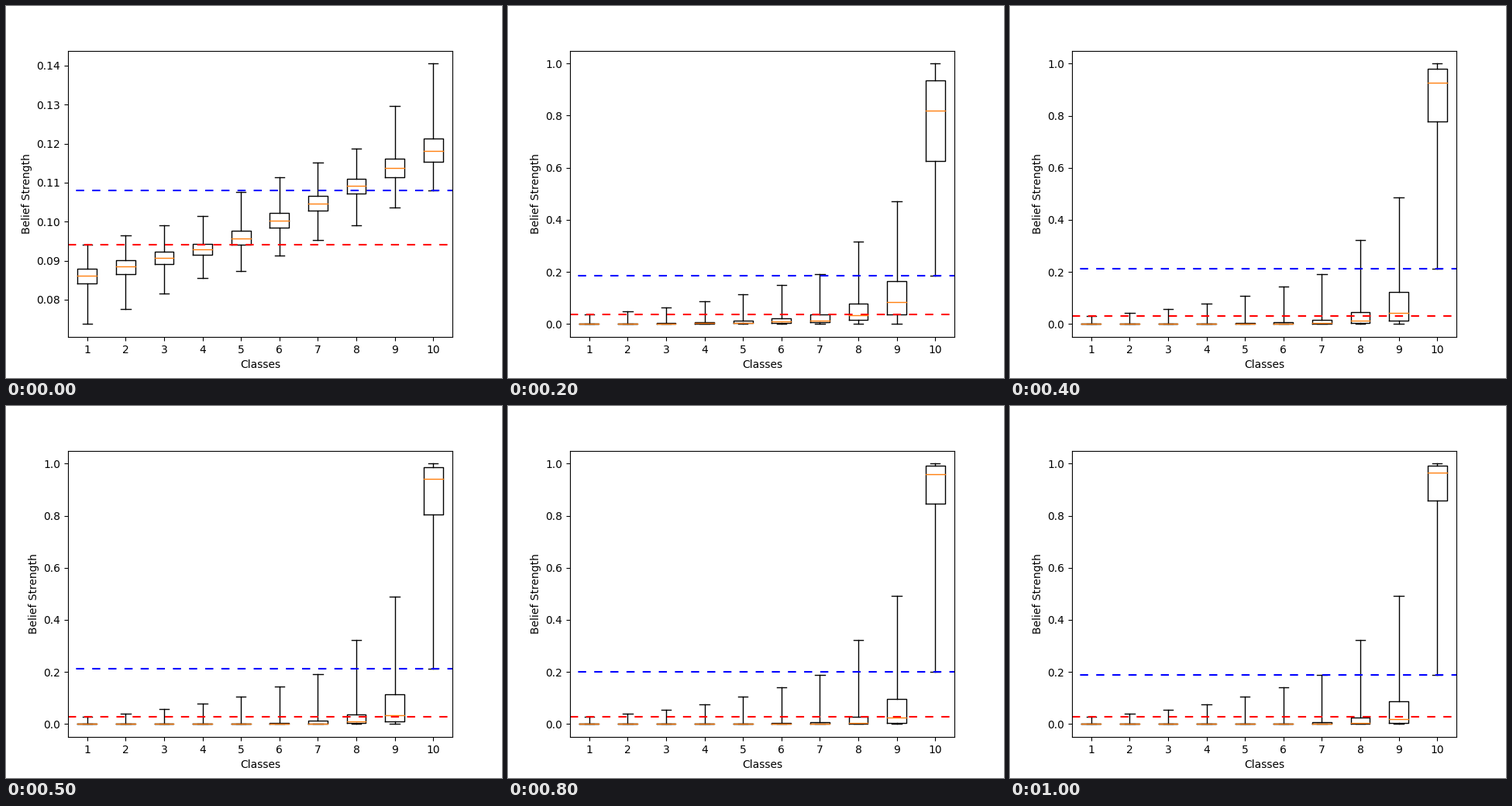
Animation of 640x480 px, one loop 1.1 s. Source, as a matplotlib script:

```python
import numpy as np
import matplotlib.pyplot as plt
from matplotlib.animation import FuncAnimation

CLASSES = np.arange(10)
TOP = CLASSES == 9
FRAMES = 11
LAST = FRAMES - 1


def curve(keys, *values):
    """Values for all classes, linear between a few key classes."""
    return np.interp(CLASSES, keys, values)


def logit(p):
    return np.log(p / (1 - p))


def trained_curve(*values):
    """Like curve, but linear in log-odds and denser among the top classes."""
    return curve((0, 1, 6, 8, 9), *logit(np.array(values)))


def learn(epoch, start, end, rate):
    """Move the log-odds from start to end with power-law slowing."""
    progress = (1 - epoch ** -rate) / (1 - LAST ** -rate)
    return 1 / (1 + np.exp(-(start + (end - start) * progress)))


def untrained():
    keys = (0, 3, 4, 7, 9)
    return (curve(keys, .07374, .0856, .0874, .0991, .1080),
            curve(keys, .0842, .0915, .0941, .1072, .1154),
            curve(keys, .0862, .0929, .0957, .1092, .1182),
            curve(keys, .0880, .0943, .0977, .1110, .1214),
            curve(keys, .0941, .1015, .1076, .1188, .1405))


# Log-odds of each statistic after the first and the last epoch.
Q1 = (trained_curve(.001, .006, .042, .115, .335),
      trained_curve(1e-5, 1e-5, 3e-4, .004, .859))
MEDIAN = (trained_curve(.004, .012, .065, .170, .460),
          trained_curve(2e-5, 2e-5, 8e-4, .020, .965))
Q3 = (trained_curve(.010, .021, .094, .225, .644),
      trained_curve(3e-5, 3e-5, .006, .088, .993))
HIGH = (trained_curve(.077, .085, .202, .411, .977),
        trained_curve(.028, .040, .190, .492, .9999))


def summary(epoch):
    """Lower whisker, quartiles and upper whisker of every class."""
    if epoch == 0:
        return untrained()
    x = np.log(epoch)
    low = np.where(TOP, .123 + .118 * x - .039 * x ** 2,
                   curve((6, 8), 0, .010) / epoch ** 2)
    box_rate = np.where(TOP, .7, .2)
    boxes = [learn(epoch, *ends, box_rate) for ends in (Q1, MEDIAN, Q3)]
    return (low, *boxes, learn(epoch, *HIGH, 2.0))


fig, ax = plt.subplots(figsize=(6.4, 4.8), dpi=100)


def draw(epoch):
    ax.clear()
    stats = np.array(summary(epoch))
    names = ("whislo", "q1", "med", "q3", "whishi")
    boxes = [dict(zip(names, column), label=str(i + 1))
             for i, column in enumerate(stats.T)]
    ax.bxp(boxes, showfliers=False,
           medianprops={"solid_capstyle": "projecting"})
    ax.axhline(stats[4, 0], color="r", linestyle=(0, (5, 5)))
    ax.axhline(stats[0, -1], color="b", linestyle=(5, (5, 5)))
    ax.set_xlabel("Classes")
    ax.set_ylabel("Belief Strength")
    return ax.get_children()


anim = FuncAnimation(fig, draw, frames=FRAMES, interval=100,
                     repeat=True, repeat_delay=0)
plt.show()
```
